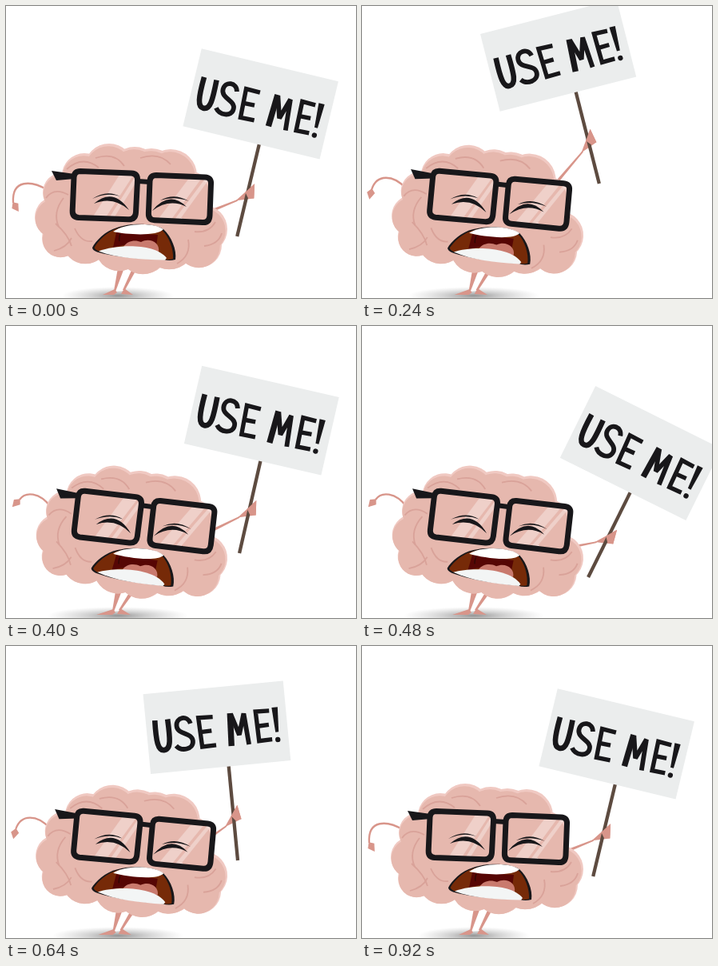
An HTML page with a canvas for the animation above (960 ms loop, 438 by 365 pixels).

```html
<!DOCTYPE html>
<html lang="en">
<head>
<meta charset="utf-8">
<title>Protesting brain</title>
<style>
  html, body { margin: 0; width: 100%; height: 100%; overflow: hidden; background: #fff; }
  canvas { display: block; }
</style>
</head>
<body>
<canvas id="stage" width="438" height="365" role="img" aria-label="A brain waving a sign: USE ME!"></canvas>
<script>
const ctx = document.getElementById('stage').getContext('2d');
const LOOP = 960, STEP = 40;
const SKIN = '#e6b8ae', RIM = '#f0c9c2', CREASE = '#d9a299', LIMB = '#d8958a', INK = '#18171a';

// time, sign angle in degrees, grip x, grip y
const signKeys = [
  [0, 13.5, 302, 234.5], [100, -3, 291, 213], [200, -15, 282, 167],
  [240, -14.3, 283.2, 168.7], [320, 0, 294, 205], [400, 12.9, 304.3, 230.4],
  [480, 26.4, 307.5, 264.7], [560, 10, 302, 238], [640, -5.5, 284.7, 213.2],
  [720, -10.6, 281, 190], [800, -7.3, 282, 207.4], [920, 13.5, 302, 234.5]
];
// time, body lean from 0 to 1
const leanKeys = [[0, 0], [240, .68], [400, 1], [480, 1], [640, .69], [800, .24], [920, 0]];

// Smooth interpolation through every key
function sample(keys, t) {
  const last = keys.length - 1;
  if (t >= keys[last][0]) return keys[last].slice(1);
  const i = keys.findIndex((k, n) => t < keys[n + 1][0]);
  const a = keys[i], b = keys[i + 1], span = b[0] - a[0], u = (t - a[0]) / span;
  const slope = (n, c) => {
    const p = keys[Math.max(n - 1, 0)], q = keys[Math.min(n + 1, last)];
    return (q[c] - p[c]) / (q[0] - p[0]) * span;
  };
  return a.slice(1).map((_, n) => {
    const c = n + 1, u2 = u * u, u3 = u2 * u;
    return (2 * u3 - 3 * u2 + 1) * a[c] + (u3 - 2 * u2 + u) * slope(i, c)
      + (3 * u2 - 2 * u3) * b[c] + (u3 - u2) * slope(i + 1, c);
  });
}

const mix = (a, b, u) => a + (b - a) * u;
const rad = deg => deg * Math.PI / 180;

function fill(d, color) {
  ctx.fillStyle = color;
  ctx.fill(new Path2D(d));
}

function line(d, color, width) {
  ctx.strokeStyle = color;
  ctx.lineWidth = width;
  ctx.stroke(new Path2D(d));
}

function around(x, y, angle, draw) {
  ctx.save();
  ctx.translate(x, y);
  ctx.rotate(angle);
  draw();
  ctx.restore();
}

// Where a point of the body ends up after leaning
const PIVOT = { x: 98, y: 285 };
function leaned(x, y, angle) {
  const dx = x - PIVOT.x, dy = y - PIVOT.y, c = Math.cos(angle), s = Math.sin(angle);
  return [PIVOT.x + dx * c - dy * s, PIVOT.y + dx * s + dy * c];
}

function drawShadow(lean) {
  ctx.save();
  ctx.translate(140, 362);
  ctx.scale(mix(70, 88, lean), 11);
  const g = ctx.createRadialGradient(0, 0, 0, 0, 0, 1);
  g.addColorStop(0, 'rgba(90,90,90,.65)');
  g.addColorStop(.45, 'rgba(130,130,130,.36)');
  g.addColorStop(1, 'rgba(160,160,160,0)');
  ctx.fillStyle = g;
  ctx.fillRect(-1, -1, 2, 2);
  ctx.restore();
}

function drawLegs(lean, angle) {
  const [lx, ly] = leaned(146, 322, angle), [rx, ry] = leaned(163, 326, angle);
  const left = mix(135, 133, lean), right = mix(148, 143, lean);
  fill(`M${lx},${ly} L${rx},${ry} L${right},356 L${left},357Z`, '#fff');
  fill(`M${lx - 5},${ly} L${lx + 4},${ly} L${left + 2},357 L${left},356Z`, LIMB);
  fill(`M${rx - 4},${ry} L${rx + 2},${ry} L${right + 1},355 L${right - 2},355Z`, LIMB);
  const toe = mix(121, 113, lean), toe2 = mix(159, 156, lean);
  fill(`M${toe},361 L${left + 1},354 L${left + 4},358 L${left},361Z`, LIMB);
  fill(`M${right - 4},360 L${right},353 L${toe2},361Z`, LIMB);
}

function drawLeftArm(lean, angle) {
  const [sx, sy] = leaned(52, 230, angle), lift = lean ** 1.4;
  const wx = 9 + 8 * lean ** 2.4, wy = mix(246, 217, lift);
  line(`M${sx},${sy} C${mix(32, 42, lean)},${mix(218, 207, lean)} `
    + `${mix(7, 24, lean)},${mix(216, 207, lean)} ${wx},${wy}`, LIMB, 2.3);
  around(wx, wy, rad(mix(58, 135, lift)), () => fill('M-1,0 L4,-5 L13,0 L5,5Z', LIMB));
}

// A long taper from inside the body to the wrist
function drawRightArm(gx, gy, tilt, angle) {
  const [sx, sy] = leaned(185, 285, angle);
  const wx = gx - 10 * Math.cos(tilt) - 11 * Math.sin(tilt);
  const wy = gy - 10 * Math.sin(tilt) + 11 * Math.cos(tilt);
  around(sx, sy, Math.atan2(wy - sy, wx - sx), () => {
    const reach = Math.hypot(wx - sx, wy - sy);
    fill(`M0,-3.4 L${reach},-.9 V.9 L0,3.4Z`, LIMB);
  });
}

function drawSign(gx, gy, tilt) {
  around(gx, gy, tilt, () => {
    fill('M-12,12 L-3,-1 L6,-14 L9.5,4 L-4,9Z', LIMB);
    fill('M-2.1,-64 H2.2 V55 H-2.1Z', '#5d4b40');
    fill('M-3,-1 L6,-14 L9.5,4 L2,5Z', LIMB);
    fill('M-98,-163 H78 V-63 H-98Z', '#ebeded');
    drawLettering();
  });
}

// Hand-painted "USE ME!"
function drawLettering() {
  ctx.save();
  ctx.miterLimit = 2;
  line('M-86.5,-129 C-87.5,-102 -86,-91 -78.5,-91 C-69.5,-91 -69.5,-104 -70.5,-129', INK, 6.6);
  line('M-42.5,-121 C-45,-132 -60,-131 -60,-119.5 C-60,-108 -41.5,-110 -41.5,-99 '
    + 'C-41.5,-88 -57,-87 -63,-95', INK, 5.8);
  line('M-14,-126.5 L-32,-127 L-30.5,-90.5 L-13,-91 M-31,-109 L-17,-109.5', INK, 5.4);
  line('M6,-88 L8,-129', INK, 7.4);
  line('M9,-127 L17,-101 L25,-127 L28,-88', INK, 5.8);
  line('M57,-127.5 L40,-128 L41,-91 L57.5,-91.5 M41,-109.5 L55,-110', INK, 5.4);
  fill('M60.5,-131 H68 L66.4,-100 H62.4Z', INK);
  ctx.beginPath();
  ctx.arc(64.5, -90.5, 3.2, 0, 7);
  ctx.fillStyle = INK;
  ctx.fill();
  ctx.restore();
}

const lobes = [
  [62, 264, 26], [71, 233, 25], [98, 212, 28], [129, 203, 31], [161, 208, 32],
  [182, 211, 33], [206, 212, 33], [228, 236, 30], [247, 279, 30], [242, 299, 28],
  [205, 296, 33], [172, 303, 32], [142, 300, 31], [100, 292, 30], [69, 290, 24], [150, 255, 70]
];
const creases = [
  'M76,204 Q96,186 116,202', 'M112,190 Q136,182 148,200', 'M168,190 Q192,182 206,198',
  'M50,240 Q60,226 78,236', 'M72,240 Q58,258 66,276', 'M62,272 Q78,286 82,300',
  'M60,306 Q76,302 82,290', 'M86,278 Q94,296 108,294', 'M214,322 Q232,312 228,292',
  'M248,300 Q266,298 270,284', 'M236,282 Q254,284 262,270'
];

function drawBrain() {
  const blob = (dx, dy, inset, color) => {
    ctx.fillStyle = color;
    ctx.beginPath();
    for (const [x, y, r] of lobes) {
      ctx.moveTo(x + dx + r - inset, y + dy);
      ctx.arc(x + dx, y + dy, r - inset, 0, 2 * Math.PI);
    }
    ctx.fill();
  };
  blob(0, 0, 0, RIM);
  blob(-.8, 1.8, 1.5, SKIN);
  creases.forEach(d => line(d, CREASE, 1.8));
}

function drawGlasses() {
  const glare = 'rgba(255,255,255,.33)';
  fill('M142,211 L159,212 L125,264 L109,263Z', glare);
  fill('M161,214 L163,220 L135,265 L129,265Z', glare);
  fill('M230,214 L245,215 L206,268 L190,267Z', glare);
  fill('M249,216 L253,218 L216,269 L210,268Z', glare);
  fill('M57,206 L86,210 L86,216 L63,218Z', INK);
  line('M165,219 L180,220', INK, 6);
  line('M93,206.5 L157,209 Q165,209.5 164.5,218 L162.5,258 Q162,267 153,266.8 '
    + 'L91,264.5 Q83,264 83.2,256 L85,214 Q85.5,206.5 93,206.5Z', INK, 7);
  line('M188,211.5 L249,214 Q257,214.5 256.5,222 L255,262 Q254.5,271 246,270.6 '
    + 'L186,267.8 Q178,267.3 178.4,259 L180,219 Q180.5,211.5 188,211.5Z', INK, 7);
}

function drawEyes() {
  fill('M110,247 Q134,226 154,255 Q134,237 110,247Z', INK);
  fill('M108,241 Q126,229 143,238 Q126,232.5 108,241Z', INK);
  fill('M183,256 Q204,230 226,251 Q204,240 183,256Z', INK);
  fill('M193,243 Q210,233 229,244 Q210,237 193,243Z', INK);
}

function drawMouth() {
  fill('M108,302 C112,294 124,281 139,277 C155,271 185,271 197,279 '
    + 'C207,288 214,305 212,317 Q204,319 198,317 C166,316 136,314 114,307.5 Q108,305 108,302Z', INK);
  fill('M110.5,302 C115,294 126,282 140,278 C155,273 185,273 195,280 '
    + 'C204,288 210,304 209,316 Q203,318 198,316 C166,315 136,313 115,306 Q111,304 110.5,302Z', '#762a08');
  fill('M138,283 L190,286 L188,301 Q160,294 134,302Z', '#560604');
  fill('M147,301 C152,293 162,292 169,295 C180,289 193,296 191,307 Q168,302 147,301Z', '#c97a6e');
  fill('M134,282 C149,271 184,270 197,279 C190,288 152,286 134,282Z', '#fff');
  fill('M116,306.5 C138,298 186,296 201,315 L199,317.5 C168,317 138,315 116,306.5Z', '#f3f5f5');
  line('M143,285 Q141,291 142,294', '#2a0804', 1.2);
}

function render(t) {
  const [deg, gx, gy] = sample(signKeys, t);
  const [lean] = sample(leanKeys, t).map(v => Math.max(0, v));
  const tilt = rad(deg), angle = rad(4.3 * lean);
  ctx.fillStyle = '#fff';
  ctx.fillRect(0, 0, 438, 365);
  drawShadow(lean);
  drawLegs(lean, angle);
  drawLeftArm(lean, angle);
  drawRightArm(gx, gy, tilt, angle);
  drawSign(gx, gy, tilt);
  around(PIVOT.x, PIVOT.y, angle, () => {
    ctx.translate(-PIVOT.x, -PIVOT.y);
    drawBrain();
    drawGlasses();
    drawEyes();
    drawMouth();
  });
}

function tick(now) {
  render(Math.floor((now % LOOP) / STEP) * STEP);
  requestAnimationFrame(tick);
}
render(0);
requestAnimationFrame(tick);
</script>
</body>
</html>
```
